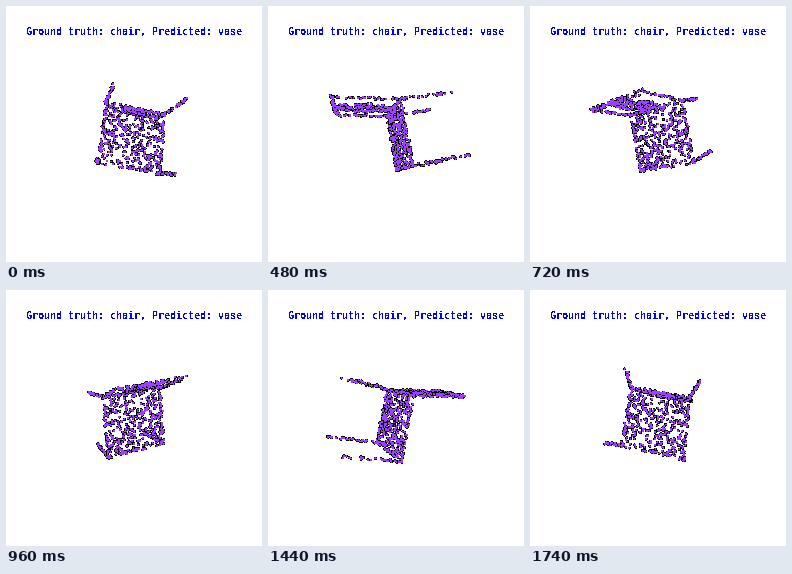
These frames come from a looping animation (256 by 256 pixels, 1.8 s). A matplotlib script:

```python
import numpy as np
import matplotlib.pyplot as plt
from matplotlib.animation import FuncAnimation

SIZE, DPI = 256, 64
FRAMES, STEP_MS = 30, 60
CAMERA = 250          # distance from the spin axis, in pixels
SLICE = 13            # depth band that shares one dark outline
PX = 72 / DPI         # points per pixel
VIOLET, BLACK = "#a040ff", "#000000"

rng = np.random.default_rng(7)

# Corners of the seat, ends of the legs and ends of the top rail: x, y up, z to camera.
seat = np.array([(-28, 31, 1), (31, 20, -6.5), (25.5, -39, 3.5), (-34, -27.3, 11)])
feet = np.array([(-15.7, 40, 53), (43.5, 28.5, 45), (32, -31, 58), (-27, -19, 66)])
rail = np.array([(-28, 31.5, -59), (28, 20.4, -61)])
normal = np.array([0.153, 0.153, 0.976])


def bar(a, b, n, r):
    """Points scattered along the rod from a to b."""
    t = rng.random((n, 1))
    return a + t * (b - a) + rng.uniform(-r, r, (n, 3))


def panel(n):
    """Points spread over the seat and through its thickness."""
    s, t = rng.random((2, n, 1))
    depth = rng.uniform(-1.5, 1.5, (n, 1))
    return seat[0] + s * (seat[1] - seat[0]) + t * (seat[3] - seat[0]) + depth * normal


def splat(n):
    """Middle slat of the back, widest halfway up."""
    t = rng.random((n, 1))
    s = 0.5 + rng.uniform(-1, 1, (n, 1)) * (0.13 + 0.09 * np.sin(np.pi * t))
    low = seat[0] + s * (seat[1] - seat[0])
    high = rail[0] + s * (rail[1] - rail[0])
    return low + t * (high - low) + rng.uniform(-0.8, 0.8, (n, 3))


parts = [panel(330), splat(170), bar(rail[0], rail[1], 75, 1.8)]
for i in range(4):
    parts.append(bar(seat[i], seat[(i + 1) % 4], 30, 1.3))
    parts.append(bar(seat[i], feet[i], 30, 1.1))
for i in range(2):
    parts.append(bar(seat[i], rail[i], 32, 1.1))
cloud = np.vstack(parts)
count = len(cloud)

# Every point is drawn twice: a dark disc, then a smaller violet one.
layer = np.repeat([0, 1], count)
widths = np.where(layer == 0, 2.0, 1.0)
areas = (widths * PX) ** 2
colors = np.where(layer == 0, BLACK, VIOLET)

fig = plt.figure(figsize=(SIZE / DPI, SIZE / DPI), dpi=DPI, facecolor="white")
ax = fig.add_axes([0, 0, 1, 1])
ax.set(xlim=(0, SIZE), ylim=(SIZE, 0))
ax.axis("off")
ax.text(128, 29, "Ground truth: chair, Predicted: vase", color="#0000ff",
        family="DejaVu Sans Mono", weight="bold", size=10 * PX,
        ha="center", va="baseline", antialiased=False)
dots = ax.scatter(np.zeros(2 * count), np.zeros(2 * count), s=areas, c=colors,
                  linewidths=0, antialiased=False)


def draw(frame):
    a = 2 * np.pi * frame / FRAMES
    x, y, z = cloud.T
    across = x * np.cos(a) + z * np.sin(a)
    depth = z * np.cos(a) - x * np.sin(a)
    scale = CAMERA / (CAMERA - depth)
    spots = np.column_stack([128 + across * scale, 128 - y * scale])

    band = np.tile(np.floor(depth / SLICE), 2)
    order = np.lexsort((layer, band))
    dots.set_offsets(np.tile(spots, (2, 1))[order])
    dots.set_sizes(areas[order])
    dots.set_facecolors(colors[order])
    return [dots]


anim = FuncAnimation(fig, draw, frames=FRAMES, interval=STEP_MS,
                     repeat=True, repeat_delay=0, blit=False)
plt.show()
```
